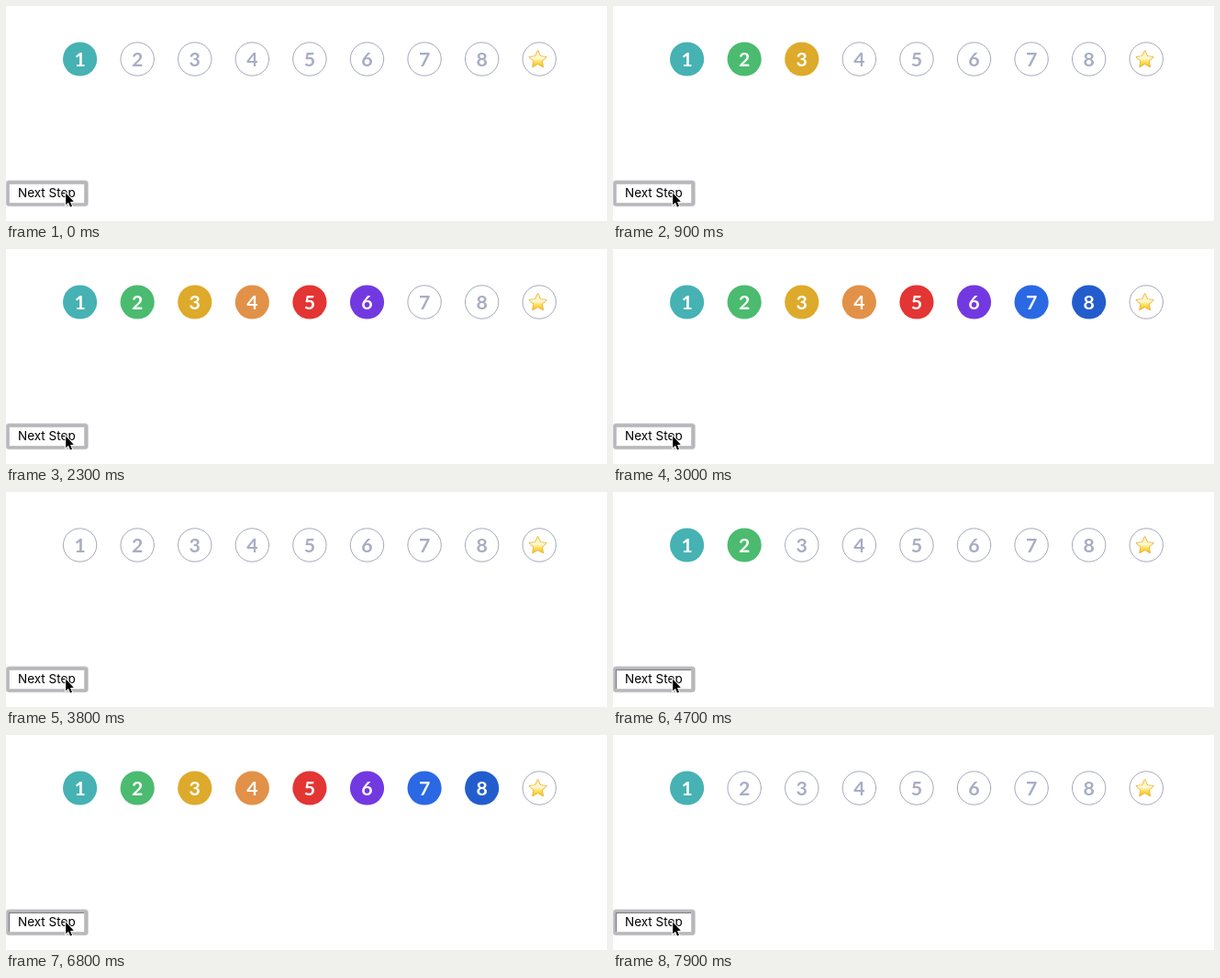
Recreate the animation shown at these times as an HTML page with a canvas. Size 655x235 px, loop 8000 ms.

```html
<!DOCTYPE html>
<html lang="en">
<head>
<meta charset="utf-8">
<title>Step indicator</title>
<style>
  html, body { margin: 0; width: 100%; height: 100%; overflow: hidden; background: #fff; }
  canvas { display: block; width: 655px; height: 235px; }
</style>
</head>
<body>
<canvas id="stage"></canvas>
<script>
const W = 655, H = 235, LOOP = 8000, TICK = 100;
const canvas = document.getElementById('stage');
const ratio = window.devicePixelRatio || 1;
canvas.width = W * ratio;
canvas.height = H * ratio;
const ctx = canvas.getContext('2d');
ctx.scale(ratio, ratio);

const COLORS = ['#46b2b3', '#4bbb70', '#deaa2b', '#e29148', '#e33533',
                '#7239e1', '#2b69e4', '#235dcd', '#1f4ba8'];
const MUTED = '#a8adc4', RING = '#a5a8ba';

// Clicking speeds up once the first round is over (times in ms).
const SLOW = { interval: 407, hold: 105 };
const FAST = { interval: 350, hold: 200 };
const SPEED_UP = 4150, SLOW_CLICKS = 9;

function clickAt(n) {
  const { interval, hold } = n < SLOW_CLICKS ? SLOW : FAST;
  const up = SPEED_UP + (n - SLOW_CLICKS) * interval;
  return { down: up - hold, up };
}

function stateAt(t) {
  let n = 0;
  while (t >= clickAt(n).up) n++;
  return {
    step: (1 + n) % (COLORS.length + 1),
    pressed: t >= clickAt(n).down
  };
}

function polygon(points) {
  ctx.beginPath();
  points.forEach(([x, y]) => ctx.lineTo(x, y));
  ctx.closePath();
}

function box(x, y, w, h, r, color) {
  ctx.beginPath();
  ctx.roundRect(x, y, w, h, r);
  ctx.fillStyle = color;
  ctx.fill();
}

function drawStar(x, y) {
  const points = Array.from({ length: 10 }, (_, i) => {
    const a = -Math.PI / 2 + i * Math.PI / 5;
    const r = i % 2 ? 4.6 : 9.6;
    return [x + r * Math.cos(a), y + r * Math.sin(a)];
  });
  const gold = ctx.createLinearGradient(x, y - 10, x, y + 9);
  gold.addColorStop(0, '#fff0a0');
  gold.addColorStop(0.45, '#fff8d8');
  gold.addColorStop(0.65, '#ffe05a');
  gold.addColorStop(1, '#f4b21a');
  polygon(points);
  ctx.lineJoin = 'round';
  ctx.lineWidth = 1.5;
  ctx.strokeStyle = '#e8b232';
  ctx.stroke();
  ctx.fillStyle = gold;
  ctx.fill();
}

function drawStep(index, active) {
  const x = 80.6 + index * 62.58, y = 58;
  ctx.beginPath();
  ctx.arc(x, y, active ? 18.6 : 18.2, 0, Math.PI * 2);
  if (active) {
    ctx.fillStyle = COLORS[index];
    ctx.fill();
  } else {
    ctx.lineWidth = 1;
    ctx.strokeStyle = RING;
    ctx.stroke();
  }
  if (index === COLORS.length - 1) {
    drawStar(x - 1.6, y + 0.6);
    return;
  }
  ctx.font = 'bold 21.3px Lato, sans-serif';
  ctx.textAlign = 'center';
  ctx.fillStyle = active ? '#fff' : MUTED;
  ctx.fillText(index + 1, x, 65.6);
}

function drawButton(pressed) {
  box(-0.5, 190.2, 90.5, 29, 4, '#d8d8db');
  box(0.5, 191.2, 88.6, 27.2, 3, '#b7b7bb');
  box(3, 194, 83, 22, 0, '#c6c6c9');
  if (pressed) box(3, 194, 82, 21, 0, '#7c7c80');
  box(4, 195, 81, 20, 0, '#fff');
  ctx.font = '13.5px Inter, sans-serif';
  ctx.textAlign = 'left';
  ctx.fillStyle = '#000';
  ctx.fillText('Next Step', 13, 209);
}

function drawCursor() {
  polygon([[65.2, 204.6], [65.2, 217.2], [68, 214.8], [70, 219.6],
           [72, 218.7], [70, 214], [73.8, 213.7]]);
  ctx.lineJoin = 'miter';
  ctx.lineWidth = 1.8;
  ctx.strokeStyle = '#fff';
  ctx.stroke();
  ctx.fillStyle = '#000';
  ctx.fill();
}

function render(now) {
  const t = Math.floor(now % LOOP / TICK) * TICK;
  const { step, pressed } = stateAt(t);
  ctx.fillStyle = '#fff';
  ctx.fillRect(0, 0, W, H);
  COLORS.forEach((_, i) => drawStep(i, i < step));
  drawButton(pressed);
  drawCursor();
}

const start = performance.now();
function tick() {
  render(performance.now() - start);
  requestAnimationFrame(tick);
}
tick();
</script>
</body>
</html>
```
